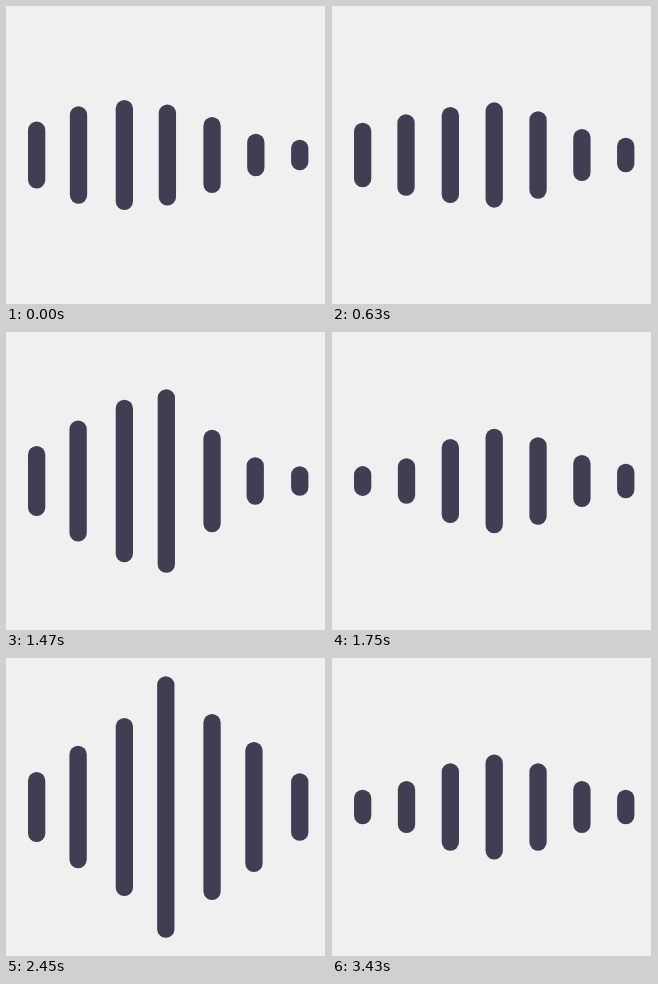
An HTML page that plays this animation: 320x298 px, repeating every 3500 ms.

```html
<!DOCTYPE html>
<html lang="en">
<head>
<meta charset="utf-8">
<title>Sound wave</title>
<style>
  html, body { margin: 0; width: 100%; height: 100%; overflow: hidden; background: #f0f0f0; }
  svg { display: block; width: 100vw; height: 100vh; }
</style>
</head>
<body>
<svg viewBox="0 0 320 298">
  <rect width="320" height="298" fill="#f0f0f0"/>
  <rect x="319" width="1" height="298" fill="#cfcfcf"/>
  <g id="bars" fill="#413d52"></g>
</svg>
<script>
// Times are counted in steps of STEP ms
const STEP = 70, STEPS = 50, PULSE = 22;
const COUNT = 7, WIDTH = 17.3, GAP = 43.85, LEFT = 22, MID = 149;
const SWING = 3.25, SETTLE = 2.6, OVER = 0.14;
const SLIDE = 4.2, SHIFT = 2.4;
const PEAKS = [70, 122, 174, 246]; // from the edge to the centre

const clamp = p => Math.min(1, Math.max(0, p));
const mix = (a, b, p) => a + (b - a) * p;
const wave = p => 0.5 - 0.5 * Math.cos(Math.PI * p);

function ease(p) {
  const a = clamp(p) ** 2, b = (1 - clamp(p)) ** 2;
  return a / (a + b);
}

// Swing past the goal, then settle back on it
const spring = v => (1 + OVER) * ease(v / SWING) - OVER * ease((v - SWING) / SETTLE);
const slide = v => ease(v / SLIDE);

const bars = Array.from({ length: COUNT }, (_, i) => {
  const el = document.createElementNS("http://www.w3.org/2000/svg", "rect");
  el.setAttribute("width", WIDTH);
  el.setAttribute("rx", WIDTH / 2);
  document.getElementById("bars").append(el);
  const depth = Math.min(i, COUNT - 1 - i);
  return {
    el,
    x: LEFT + GAP * i,
    shift: i % 2 ? SHIFT : 0,
    low: mix(34.5, 105, wave(depth / 3)),
    high: PEAKS[depth],
    up: 6.95 + 0.64 * i,   // rises from left to right
    down: 21.27 - 0.57 * i // falls from right to left
  };
});

function draw(ms) {
  let q = Math.floor(ms / STEP) % STEPS % PULSE;
  if (q < 7) q += PULSE;
  for (const b of bars) {
    const pulse = curve => curve(q - b.up) - curve(q - b.down);
    const h = mix(b.low, b.high, pulse(spring));
    b.el.setAttribute("x", b.x - b.shift * pulse(slide));
    b.el.setAttribute("y", MID - h / 2);
    b.el.setAttribute("height", h);
  }
}

let start;
function tick(now) {
  start ??= now;
  draw(Math.max(0, now - start));
  requestAnimationFrame(tick);
}
draw(0);
requestAnimationFrame(tick);
</script>
</body>
</html>
```
